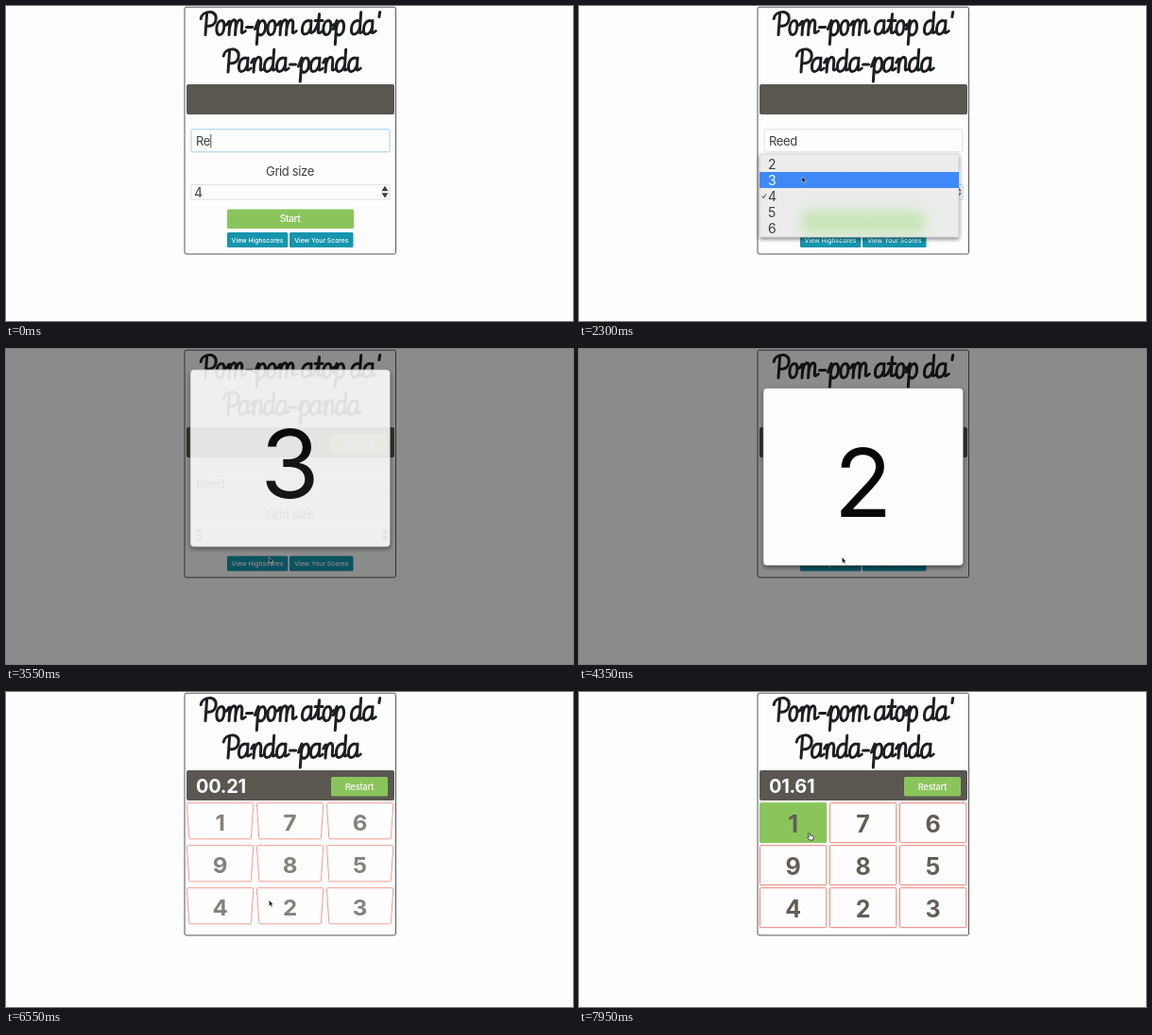
Write an HTML page that moves like this. It is 600x334 px and loops after 8000 ms.

```html
<!DOCTYPE html>
<html lang="en">
<head>
<meta charset="utf-8">
<title>Number grid game</title>
<style>
html, body { margin: 0; width: 100%; height: 100%; overflow: hidden; background: #fdfdfd; }
svg { display: block; width: 100%; height: 100%; font-family: Inter, Roboto, sans-serif; }
.mid { text-anchor: middle; }
.field { font-size: 13px; letter-spacing: -.35px; fill: #3c3f42; }
.digit { font-size: 14px; fill: #3c3f42; }
.small { font-size: 6.8px; font-weight: 500; fill: #fff; text-anchor: middle; }
.tile { font-size: 25px; font-weight: 700; fill: #625d55; text-anchor: middle; }
.script { fill: none; stroke: #1d2023; stroke-width: 3; stroke-linecap: round; stroke-linejoin: round; }
</style>
</head>
<body>
<svg id="stage" viewBox="0 0 600 334" preserveAspectRatio="none">
  <defs>
    <filter id="shade" x="-10%" y="-10%" width="120%" height="125%">
      <feDropShadow dx="0" dy="2" stdDeviation="2.2" flood-color="#000" flood-opacity=".5"/>
    </filter>
    <filter id="soft" x="-20%" y="-100%" width="140%" height="300%"><feGaussianBlur stdDeviation="6.5"/></filter>
    <clipPath id="listClip"><rect x="191" y="157" width="211" height="88"/></clipPath>
  </defs>
  <rect width="600" height="334" fill="#fdfdfd"/>
  <rect id="card" x="189" y="1.2" width="223.5" rx="2" fill="#fdfdfd" stroke="#55565a"/>
  <g id="title" class="script" role="img"></g>
  <rect x="191" y="83" width="220" height="32" rx="2" fill="#5a5751"/>

  <g id="gameBar">
    <text id="clock" x="201" y="107" font-size="20" font-weight="700" letter-spacing="-.3" fill="#fff"></text>
    <g id="restart">
      <rect x="344" y="90" width="60" height="20.5" rx="1.5" fill="#8ac55c"/>
      <text class="mid" x="374" y="103.7" font-size="9.2" font-weight="500" letter-spacing="-.1" fill="#fff">Restart</text>
    </g>
  </g>

  <g id="form">
    <rect id="nameBox" x="196" y="130.8" width="210" height="24" rx="1" fill="#fdfdfd"/>
    <text id="name" class="field" x="201" y="148"></text>
    <path id="caret" d="M216.8 136V150.5" stroke="#444" stroke-width=".9"/>
    <text class="mid field" x="300.5" y="180">Grid size</text>
    <rect id="sizeBox" x="196" y="189.5" width="210" height="15.7" rx="1" fill="#fdfdfd"/>
    <text id="size" class="digit" x="199" y="203"></text>
    <path d="M397.5 196.2L401 190.8L404.5 196.2ZM397.5 198.2L401 203.6L404.5 198.2Z" fill="#3f4042"/>
    <g id="start">
      <rect x="234" y="215.5" width="134" height="20.5" rx="1.5" fill="#8ac55c"/>
      <text class="mid" x="300.5" y="229.4" font-size="10.3" font-weight="500" letter-spacing="-.4" fill="#fff">Start</text>
    </g>
    <g id="links">
      <rect x="234" y="240" width="64.3" height="16" rx="1.5" fill="#1595ad"/>
      <rect x="300" y="240" width="67.5" height="16" rx="1.5" fill="#1595ad"/>
      <text class="small" x="266" y="250.5">View Highscores</text>
      <text class="small" x="333.8" y="250.5">View Your Scores</text>
    </g>
  </g>

  <g id="tiles"></g>

  <g id="list">
    <rect x="191" y="157" width="211" height="88" rx="1" fill="#ececec" stroke="#c4c4c4" stroke-width=".6" filter="url(#shade)"/>
    <g clip-path="url(#listClip)">
      <rect x="236" y="217" width="130" height="25" fill="#c3e6b0" opacity=".85" filter="url(#soft)"/>
    </g>
    <rect id="glow" x="191" width="211" height="17" fill="#3d89f6"/>
    <g id="options" class="digit"></g>
    <path id="check" d="M193.7 201.7L195.2 203.6L198 199.4" fill="none" stroke-width="1"/>
  </g>

  <rect id="backdrop" width="600" height="334" fill="#000"/>
  <g id="modal">
    <rect x="195" y="41.5" width="211.5" height="188" rx="4" fill="#fdfdfd" stroke="#777" stroke-width=".5" filter="url(#shade)"/>
    <text id="count" class="mid" x="300.5" y="178" font-size="101" fill="#060708"></text>
  </g>

  <g id="arrow">
    <path d="M0 0V6.2L1.5 4.9L2.6 7.3L3.7 6.8L2.7 4.5H4.6Z" fill="#111" stroke="#fff" stroke-width=".45"/>
  </g>
  <g id="hand">
    <path d="M-.4 .4Q.5 -.6 1.2 .5L1.7 2.4L4.2 2.9Q5.4 3.4 5.2 5L4.6 7.5H1L-1.3 4.5Q-1 3.2 .4 4.3Z" fill="#fff" stroke="#222" stroke-width=".8" stroke-linejoin="round"/>
  </g>
</svg>
<script>
const LOOP = 8000;
const $ = id => document.getElementById(id);
const set = (el, attrs) => { for (const k in attrs) el.setAttribute(k, attrs[k]); };
const add = (parent, tag, attrs, text = '') => {
  const el = document.createElementNS('http://www.w3.org/2000/svg', tag);
  set(el, attrs);
  el.textContent = text;
  return parent.appendChild(el);
};
const show = (id, on) => { $(id).style.display = on ? '' : 'none'; };
const ramp = (t, from, to) => Math.min(1, Math.max(0, (t - from) / (to - from)));
const easeOut = p => 1 - (1 - p) ** 3;
const easeInOut = p => p * p * (3 - 2 * p);

// Script lettering: [advance, stroke], baseline at 0
const bowl = 'M9 -13C7 -17 0 -15 0 -6C0 2 7 1 9 -8';
const glyphs = {
  P: [17, 'M6 -22V0M0 -17C1 -26 16 -27 16 -17C16 -10 10 -8 6 -10'],
  o: [11, 'M5 -15C-1 -15 -1 0 4 0S10 -15 5 -15M8 -9Q9 -9 11 -11'],
  m: [20, 'M0 -11Q3 -17 3 -12V0M3 -6C4 -18 9.5 -18 9.5 -11V0M9.5 -6C10.5 -18 16 -18 16 -11V-4Q16 0 20 -4'],
  n: [14, 'M0 -10Q3 -17 3 -12V0M3 -6C4 -18 10 -18 10 -11V-4Q10 0 14 -4'],
  p: [13, 'M0 -6L3 -15V10M3 -6C4 -18 11 -17 11 -8C11 1 5 2 3 -2'],
  a: [13, bowl + 'M9 -15V-4Q9 0 13 -4'],
  d: [13, bowl + 'M9 -24V-4Q9 0 13 -4'],
  t: [9, 'M0 -4Q4 -10 4 -22V-4Q4 0 9 -4M0 -15H8'],
  '-': [10, 'M1 -8H7'],
  "'": [5, 'M3 -24L2.5 -19'],
  ' ': [6, '']
};
function letter(line, x, y) {
  const g = add($('title'), 'g', { transform: `translate(${x} ${y}) skewX(-4)` });
  let pen = 0;
  for (const c of line) {
    const [width, d] = glyphs[c];
    add(g, 'path', { d, transform: `translate(${pen} 0)` });
    pen += width;
  }
}
const lines = ["Pom-pom atop da'", 'Panda-panda'];
letter(lines[0], 205, 30.5);
letter(lines[1], 229, 70);
set($('title'), { 'aria-label': lines.join(' ') });

const options = [2, 3, 4, 5, 6].map((n, i) =>
  add($('options'), 'text', { x: 200, y: 172.5 + 17 * i }, n));

const tiles = [1, 7, 6, 9, 8, 5, 4, 2, 3].map((n, i) => {
  const g = add($('tiles'), 'g', { transform: `translate(${226.6 + 74 * (i % 3)} ${117.7 + 45 * Math.floor(i / 3)})` });
  return {
    box: add(g, 'path', { 'stroke-linejoin': 'round', 'stroke-width': 1 }),
    label: add(g, 'text', { class: 'tile' }, n)
  };
});

// Each tile swings in around its top edge
function drawTiles(t) {
  const angle = (1 - easeOut(ramp(t, 6350, 6770))) * Math.PI / 2;
  const depth = 126;
  const scaleAt = y => depth / (depth + y * Math.sin(angle));
  const yAt = y => y * Math.cos(angle) * scaleAt(y);
  const half = 35.2 * scaleAt(42), bottom = yAt(42);
  const mid = scaleAt(21);
  $('tiles').setAttribute('opacity', ramp(t, 6350, 6610));
  tiles.forEach(({ box, label }, i) => {
    const hit = i === 0 && t >= 7750;
    set(box, {
      d: `M-34.2 0H34.2Q35.2 0 35.2 1L${half} ${bottom - 1}Q${half} ${bottom} ${half - 1} ${bottom}H${1 - half}Q${-half} ${bottom} ${-half} ${bottom - 1}L-35.2 1Q-35.2 0 -34.2 0Z`,
      fill: hit ? '#8ac55c' : '#fdfdfd',
      stroke: hit ? '#8ac55c' : '#ec8076'
    });
    set(label, { transform: `translate(0 ${yAt(21)}) scale(${mid} ${mid * Math.cos(angle)}) translate(0 10)` });
  });
}

// Pointer moves: start, end, x, y
const moves = [[500, 1000, 234.5, 195], [1750, 2000, 236, 181], [2500, 2950, 278.3, 220.8], [7250, 7650, 243, 149.5]];
function drawPointer(t) {
  let x = 331, y = 241;
  for (const [from, to, nx, ny] of moves) {
    const p = easeInOut(ramp(t, from, to));
    x += (nx - x) * p;
    y += (ny - y) * p;
  }
  const hand = t >= 7250;
  show('arrow', t >= 200 && !hand);
  show('hand', hand);
  set($(hand ? 'hand' : 'arrow'), { transform: `translate(${x} ${y})` });
}

function drawForm(t) {
  const started = t >= 3350, typing = t < 1200;
  $('name').textContent = t < 50 ? 'Re' : t < 150 ? 'Ree' : 'Reed';
  const caretX = t < 50 ? 0 : t < 150 ? 7 : 14.5;
  set($('caret'), { transform: `translate(${caretX} 0)` });
  show('caret', t < 500 || (t >= 1000 && typing));
  set($('nameBox'), { stroke: typing ? '#a3cff5' : '#e0e0e0' });
  set($('sizeBox'), { stroke: t >= 2250 && !started ? '#b5d6ef' : '#e0e0e0' });
  $('size').textContent = t < 2250 ? 4 : 3;
  show('start', !started);
  set($('links'), { transform: `translate(0 ${started ? -20.5 : 0})` });
}

function drawList(t) {
  show('list', t >= 1200 && t < 2450);
  $('list').style.opacity = 1 - ramp(t, 2300, 2450);
  const pick = t < 1870 ? 2 : 1;
  set($('glow'), { y: 159 + 17 * pick });
  options.forEach((o, i) => set(o, { fill: i === pick ? '#fff' : '#3c3f42' }));
  set($('check'), { stroke: pick === 2 ? '#fff' : '#3c3f42' });
}

function drawModal(t) {
  const dim = ramp(t, 3350, 3450) * (1 - ramp(t, 6380, 6530));
  const fade = ramp(t, 3450, 3565) * (1 - ramp(t, 6350, 6500));
  const slide = t < 6000 ? 1 - easeOut(ramp(t, 3450, 3850)) : easeOut(ramp(t, 6350, 6650));
  $('backdrop').setAttribute('opacity', .45 * dim);
  show('modal', fade > 0);
  set($('modal'), { opacity: fade, transform: `translate(0 ${-47 * slide})` });
  $('count').textContent = t < 4350 ? 3 : t < 5350 ? 2 : 1;
}

function draw(t) {
  const playing = t >= 6350, started = t >= 3350;
  set($('card'), { height: playing ? 256.8 : started ? 241 : 261.8 });
  show('form', !playing);
  show('tiles', playing);
  show('restart', started);
  $('clock').textContent = playing ? ((t - 6340) / 1000).toFixed(2).padStart(5, '0') : '';
  drawForm(t);
  drawList(t);
  drawTiles(t);
  drawModal(t);
  drawPointer(t);
}

const begun = performance.now();
function tick() {
  draw((performance.now() - begun) % LOOP);
  requestAnimationFrame(tick);
}
tick();
</script>
</body>
</html>
```
